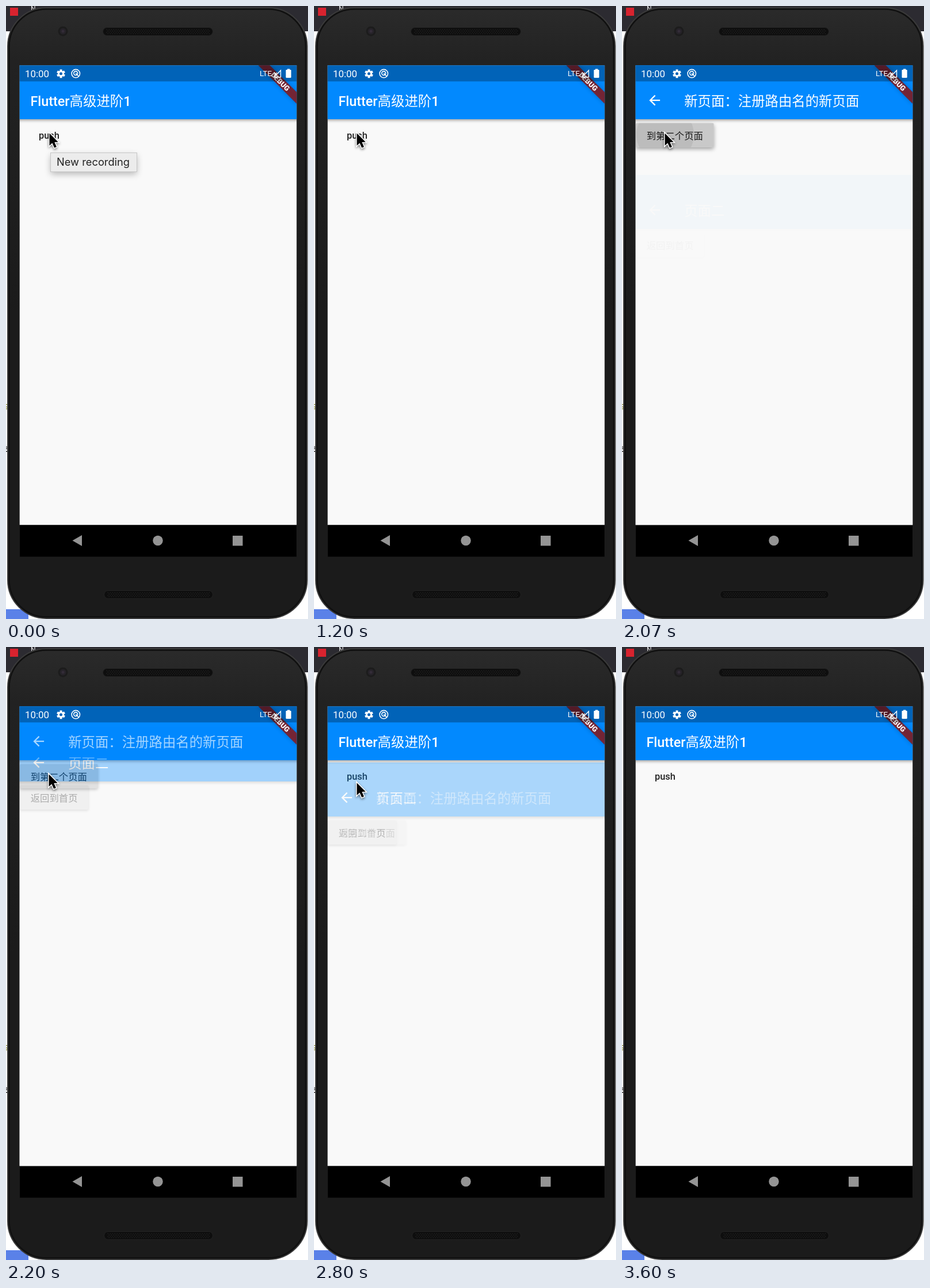
An HTML page with a canvas that plays this animation: 525x1067 px, repeating every 3740 ms.

```html
<!DOCTYPE html>
<html lang="zh">
<head>
<meta charset="utf-8">
<title>Flutter route demo</title>
<style>
html, body { margin: 0; width: 100%; height: 100%; overflow: hidden; background: #fff; }
canvas { display: block; }
</style>
</head>
<body>
<canvas id="stage" width="525" height="1067"></canvas>
<script>
const W = 525, H = 1067, LOOP = 3740;
const BLUE = '#0289fe', PAPER = '#f9f9f9';
const CJK = '"Noto Sans CJK SC", "Noto Sans CJK JP", "Noto Sans CJK", sans-serif';
const LATIN = 'Roboto, sans-serif';
const DP = 481 / 411.43; // pixels per logical unit
const SCREEN = { x: 23.7, y: 103.3, w: 481.5, h: 800 };

const ctx = document.getElementById('stage').getContext('2d');
const makeLayer = () => Object.assign(document.createElement('canvas'), { width: W, height: H }).getContext('2d');
const shell = makeLayer(), layer = makeLayer();

const clamp = v => Math.max(0, Math.min(1, v));

function rect(c, x, y, w, h, fill) {
  c.fillStyle = fill;
  c.fillRect(x, y, w, h);
}

function round(c, x, y, w, h, r, fill, stroke, lw = 1) {
  c.beginPath();
  c.roundRect(x, y, w, h, r);
  if (fill) { c.fillStyle = fill; c.fill(); }
  if (stroke) { c.strokeStyle = stroke; c.lineWidth = lw; c.stroke(); }
}

function disc(c, x, y, r, fill) {
  c.beginPath();
  c.arc(x, y, r, 0, Math.PI * 2);
  c.fillStyle = fill;
  c.fill();
}

function poly(c, pts, fill) {
  c.beginPath();
  pts.forEach(([x, y]) => c.lineTo(x, y));
  c.closePath();
  c.fillStyle = fill;
  c.fill();
}

// Returns the x position after the text
function text(c, str, x, y, font, fill) {
  c.font = font;
  c.fillStyle = fill;
  c.fillText(str, x, y);
  return x + c.measureText(str).width;
}

function shade(c, color, blur, dy) {
  c.shadowColor = color;
  c.shadowBlur = blur;
  c.shadowOffsetY = dy;
}

function bezier(x1, y1, x2, y2) {
  const at = (s, a, b) => 3 * (1 - s) * (1 - s) * s * a + 3 * (1 - s) * s * s * b + s * s * s;
  return x => {
    let lo = 0, hi = 1;
    for (let i = 0; i < 24; i++) {
      const mid = (lo + hi) / 2;
      if (at(mid, x1, x2) < x) lo = mid; else hi = mid;
    }
    return at(hi, y1, y2);
  };
}
const slideCurve = bezier(0.4, 0, 0.2, 1);
const fadeCurve = bezier(0.42, 0, 1, 1);

// Linear interpolation through [time, value] pairs
function track(keys, t) {
  if (t <= keys[0][0]) return keys[0][1];
  for (let i = 1; i < keys.length; i++) {
    const [t0, v0] = keys[i - 1], [t1, v1] = keys[i];
    if (t < t1) return v0 + (v1 - v0) * (t - t0) / (t1 - t0);
  }
  return keys[keys.length - 1][1];
}

const popKeys = [[2605, 1], [2907, 0]];
const firstPush = [[1250, 0], [1330, 0.37], [1400, 0.56], [1535, 1], ...popKeys];
const secondPush = [[2030, 0], [2070, 0.13], [2130, 0.355], [2200, 0.535], [2340, 1], ...popKeys];
const cursorX = [[0, 75.5], [70, 75], [330, 74.5], [3000, 74.5], [3130, 62], [3330, 18], [3470, -22]];
const cursorY = [[0, 221.5], [2470, 221.5], [2600, 236.5], [3000, 236.5], [3470, 248]];

function grille(c, x, y, w) {
  round(c, x, y, w, 14, 7, '#0e0e0e', '#242424');
  for (let row = 0; row < 4; row++)
    for (let px = x + 6 + (row % 2) * 2; px < x + w - 5; px += 4)
      rect(c, px, y + 3 + row * 2.4, 1.6, 1.2, '#262626');
}

function drawShell(c) {
  rect(c, 0, 0, W, H, '#fff');
  rect(c, 0, 0, W, 44, '#2c2b31');
  rect(c, 0, 1050, 39, 17, '#5a81e8');
  rect(c, 7, 3, 14, 14, '#d8232f');
  text(c, 'N', 43, 9, '12px ' + LATIN, '#eee');
  text(c, 's', -5, 702, '17px "Noto Sans Mono", monospace', '#8a8a2a');
  text(c, 'e', -5, 776, '17px "Noto Sans Mono", monospace', '#000');

  const body = c.createLinearGradient(0, 0, 0, H);
  body.addColorStop(0, '#2b2b2b');
  body.addColorStop(0.09, '#222');
  body.addColorStop(0.5, '#1b1b1b');
  body.addColorStop(1, '#1b1b1b');
  round(c, 3, 3, 520.5, 1063, 67, body, '#3a3a3a', 2);
  round(c, 5.5, 5.5, 515.5, 1058, 64.5, null, '#101010', 2.5);

  grille(c, 168.5, 37.5, 191);
  grille(c, 170.5, 1017.5, 189);
  disc(c, 99, 44, 8.5, '#1c1c1c');
  disc(c, 99, 44, 5.5, '#262329');
  disc(c, 99, 44, 2.5, '#332c38');

  rect(c, 24, 103, 481, 855.5, '#000');
  poly(c, [[115.5, 930.5], [132, 921], [132, 940]], '#949494');
  disc(c, 264, 930.5, 8.7, '#949494');
  rect(c, 394, 922, 17.5, 17.5, '#949494');
}

function drawBar(c) {
  rect(c, 23, 103, 483, 801, PAPER);
  c.save();
  shade(c, 'rgba(0,0,0,.38)', 5, 2);
  rect(c, 16, 103, 497, 94, BLUE);
  c.restore();
}

function drawHome(c) {
  drawBar(c);
  const latin = '500 23.4px ' + LATIN;
  let x = text(c, 'Flutter', 42.4, 174.3, latin, '#fff');
  x = text(c, '高级进阶', x, 174.3, '23.4px ' + CJK, '#fff');
  text(c, '1', x, 174.3, latin, '#fff');
  text(c, 'push', 57, 231, '500 16.4px ' + LATIN, 'rgba(0,0,0,.87)');
}

const backArrow = new Path2D('M20 11H7.83l5.59-5.59L12 4l-8 8 8 8 1.41-1.41L7.83 13H20v-2z');

function drawButton(c, label, press) {
  const x = 24, y = 203.8, w = label.length * 16.37 + 37.4, h = 42.1;
  c.save();
  shade(c, `rgba(0,0,0,${0.28 + 0.08 * press.glow})`, 4 + 4 * press.glow, 2 + press.glow);
  round(c, x, y, w, h, 2.3, '#e0e0e0');
  c.restore();
  if (press.glow > 0) {
    c.save();
    c.beginPath();
    c.roundRect(x, y, w, h, 2.3);
    c.clip();
    rect(c, x, y, w, h, `rgba(0,0,0,${0.105 * press.glow})`);
    disc(c, 75, 224, press.radius, `rgba(0,0,0,${0.065 * press.glow})`);
    c.restore();
  }
  text(c, label, 42.7, 232, '16.37px ' + CJK, 'rgba(0,0,0,.87)');
}

function pressState(t, down, up) {
  return {
    glow: track([[down, 0], [down + 70, 1], [up, 1], [up + 200, 0]], t),
    radius: clamp((t - down) / 400) * 125
  };
}

function drawRoute(progress, title, label, press) {
  if (progress <= 0) return;
  const c = layer;
  drawBar(c);
  c.save();
  c.translate(42.7, 150.1);
  c.scale(DP, DP);
  c.fillStyle = '#fff';
  c.fill(backArrow);
  c.restore();
  text(c, title, 108.2, 174.3, '23.4px ' + CJK, '#fff');
  drawButton(c, label, press);

  ctx.save();
  ctx.globalAlpha = fadeCurve(progress);
  const dy = Math.round((1 - slideCurve(progress)) * SCREEN.h / 4);
  ctx.drawImage(layer.canvas, 23, 103, 483, 801, 23, 103 + dy, 483, 801);
  ctx.restore();
}

function drawRibbon(c) {
  c.save();
  c.translate(505, 103.5);
  c.rotate(Math.PI / 4);
  const far = 40 * DP, tall = 12 * DP;
  c.save();
  shade(c, 'rgba(0,0,0,.5)', 7, 0);
  rect(c, -far, far - tall, far * 2, tall, 'rgba(0,0,0,.5)');
  c.restore();
  rect(c, -far, far - tall, far * 2, tall, 'rgba(183,28,28,.63)');
  c.textAlign = 'center';
  text(c, 'DEBUG', 0, far - tall / 2 + 4.4, '900 12.5px ' + LATIN, '#fff');
  c.restore();
}

function drawStatus(c) {
  rect(c, 23, 103, 483, 28.3, 'rgba(0,0,0,.28)');
  text(c, '10:00', 33, 124, '16.9px ' + LATIN, '#fff');

  c.save();
  c.translate(95.5, 117.8);
  for (let i = 0; i < 6; i++) {
    rect(c, -2, -7.4, 4, 5, '#fff');
    c.rotate(Math.PI / 3);
  }
  disc(c, 0, 0, 5.5, '#fff');
  disc(c, 0, 0, 2.5, '#0163b7');
  c.restore();

  c.strokeStyle = '#fff';
  c.lineWidth = 1.6;
  c.beginPath();
  c.arc(121.3, 117.6, 7.2, 0, Math.PI * 2);
  c.moveTo(124.6, 117);
  c.arc(121.2, 117, 3.4, 0, Math.PI * 2);
  c.moveTo(121.2, 117);
  c.lineTo(127, 123);
  c.stroke();

  text(c, 'LTE', 441, 122, '13.4px ' + LATIN, '#fff');
  c.lineWidth = 1.4;
  c.beginPath();
  c.moveTo(477.5, 112);
  c.lineTo(477.5, 124);
  c.lineTo(466, 124);
  c.closePath();
  c.moveTo(466, 116);
  c.lineTo(471, 121);
  c.moveTo(471, 116);
  c.lineTo(466, 121);
  c.stroke();
  rect(c, 489, 109.5, 4.5, 3, '#fff');
  round(c, 486.5, 111, 9.2, 14, 1.2, '#fff');
}

function drawTooltip(c, alpha) {
  if (alpha <= 0) return;
  c.save();
  c.globalAlpha = alpha;
  c.save();
  shade(c, 'rgba(0,0,0,.28)', 12, 4);
  rect(c, 78, 256, 149, 32.5, '#ececec');
  c.restore();
  c.strokeStyle = '#c6c6c6';
  c.lineWidth = 1;
  c.strokeRect(77.5, 255.5, 150, 33);
  text(c, 'New recording', 88, 278, '18.3px Inter, sans-serif', '#222');
  c.restore();
}

const arrow = [[0, 0], [0, 21.5], [4.9, 17], [8.6, 25.3], [12.4, 23.7], [8.8, 15.5], [15.2, 15.3]];

function drawCursor(c, x, y) {
  if (x < -20) return;
  c.save();
  c.translate(x, y);
  shade(c, 'rgba(0,0,0,.4)', 4, 2);
  poly(c, arrow, '#fff');
  c.strokeStyle = '#fff';
  c.lineWidth = 3;
  c.stroke();
  c.shadowColor = 'transparent';
  poly(c, arrow, '#000');
  c.restore();
}

function render(t) {
  ctx.drawImage(shell.canvas, 0, 0);
  ctx.save();
  ctx.beginPath();
  ctx.rect(SCREEN.x, SCREEN.y, SCREEN.w, SCREEN.h);
  ctx.clip();
  drawHome(ctx);
  drawRoute(track(firstPush, t), '新页面：注册路由名的新页面', '到第二个页面', pressState(t, 1910, 2065));
  drawRoute(track(secondPush, t), '页面二', '返回到首页', pressState(t, 2465, 2610));
  drawRibbon(ctx);
  drawStatus(ctx);
  ctx.restore();
  drawTooltip(ctx, track([[820, 1], [1040, 0]], t));
  drawCursor(ctx, track(cursorX, t), track(cursorY, t));
}

const stepTime = k => Math.round(k * 20 / 3) * 10;
function snap(t) {
  let k = Math.floor((t + 4) * 0.015);
  if (stepTime(k) > t) k--;
  return stepTime(Math.max(0, k));
}

drawShell(shell);
const begin = performance.now();
function frame() {
  render(snap((performance.now() - begin) % LOOP));
  requestAnimationFrame(frame);
}
frame();
</script>
</body>
</html>
```
